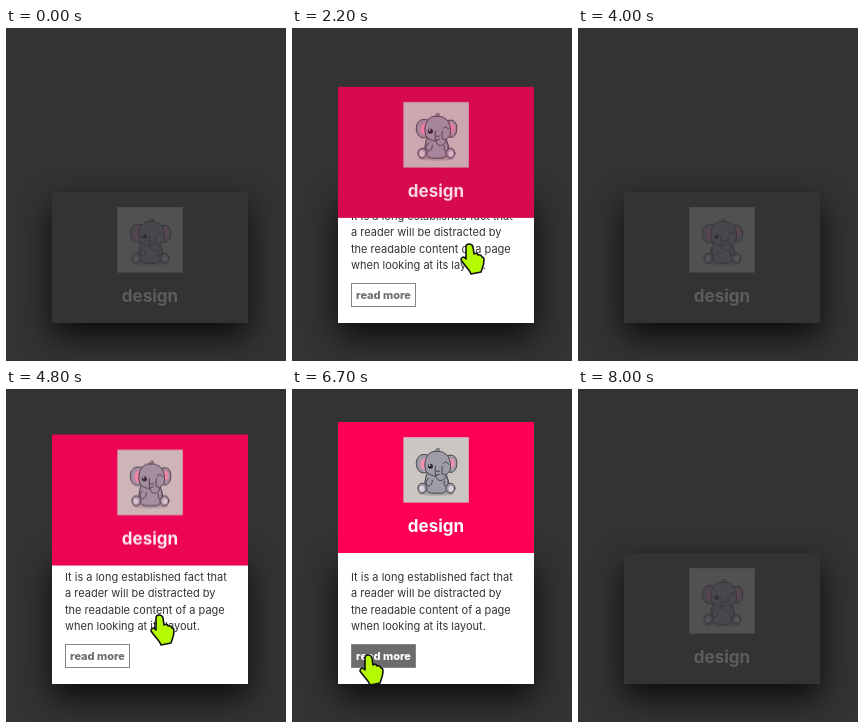
Animation, 280 px wide and 333 px high, one loop 9.2 s. Source, as an HTML page:

```html
<!DOCTYPE html>
<html lang="en">
<head>
<meta charset="utf-8">
<title>Hover card</title>
<style>
  html, body { margin: 0; width: 100%; height: 100%; overflow: hidden; background: #343235; }
  svg { display: block; width: 100vw; height: 100vh; }
  text { font-family: Inter, "Open Sans", sans-serif; }
  .copy { font-size: 11px; fill: #333; }
  .title { font-size: 17px; font-weight: 700; fill: #fff; text-anchor: middle; }
  .label { font-size: 11px; font-weight: 800; fill: #707070; text-anchor: middle; }
  .shadow { filter: blur(16.5px); opacity: .8; }
  .ink { stroke: #46444d; stroke-width: 1; stroke-linecap: round; stroke-linejoin: round; }
  .cursor { fill: #b5fa00; stroke: #111; stroke-width: 1.6; stroke-linejoin: round; }
</style>
</head>
<body>
<svg viewBox="0 0 280 333">
  <rect class="shadow" x="46" y="177" width="196" height="131"/>

  <rect x="46" y="164" width="196" height="131" fill="#fff"/>
  <g class="copy">
    <text x="59" y="192">It is a long established fact that</text>
    <text x="59" y="208.4">a reader will be distracted by</text>
    <text x="59" y="224.8">the readable content of a page</text>
    <text x="59" y="241.2">when looking at its layout.</text>
  </g>
  <rect id="button" x="59.5" y="255.5" width="64" height="23" fill="#fff" stroke="#858585"/>
  <text id="label" class="label" x="91.5" y="271">read more</text>

  <g id="face">
    <rect id="panel" x="46" y="33" width="196" height="131" fill="#343235"/>
    <g id="content">
      <g transform="translate(111.4 48.2)">
        <rect width="65.4" height="65.4" fill="#cbc6c2"/>
        <ellipse cx="33" cy="56" rx="18" ry="2.5" fill="#aaa5a5"/>
        <g class="ink" fill="#9d9ca7">
          <path d="M23 37Q18 55 28 56H39Q49 53 43 37Z"/>
          <path d="M27 19C18 14 12 20 13 28C14 35 20 38 25 34Z"/>
          <path d="M43 19C51 15 55 22 53 30C51 36 47 36 44 34Z"/>
          <path d="M25 20C15 20 15 32 22 33Q26 28 25 20ZM46 21C54 20 52 32 46 32Q44 27 46 21Z" fill="#ef91b0" stroke="none"/>
          <path d="M34 14C24 13 20 23 22 32C24 41 44 42 47 32C48 22 44 14 34 14Z"/>
          <path d="M32 14Q33 10 36 12Q34 13 36 14" fill="none"/>
          <path d="M32 29C31 38 33 45 39 43C44 41 42 36 39 37Q38 35 39 29" />
          <path d="M33 34L36 34M33 38L36 37" fill="none"/>
          <path d="M40 26Q43 23 45 27" fill="none"/>
          <ellipse cx="19" cy="51" rx="4.5" ry="5"/>
          <ellipse cx="47" cy="51" rx="4.5" ry="5"/>
          <path d="M25 41Q20 46 25 49Q29 48 29 43M41 44Q40 49 43 49Q46 47 44 41"/>
        </g>
        <circle cx="27" cy="29" r="2.5" fill="#29262e"/>
        <circle cx="26.3" cy="28" r=".8" fill="#fff"/>
        <ellipse cx="18.5" cy="51.5" rx="2.5" ry="3" fill="#d9d5da"/>
        <ellipse cx="47.5" cy="51.5" rx="2.5" ry="3" fill="#d9d5da"/>
      </g>
      <text class="title" x="144" y="143">design</text>
    </g>
  </g>

  <g id="pointer" class="cursor">
    <path id="arrow" d="M0 0V20L4.5 16.5L8 24.5L12 22.5L8.5 15H14.5Z"/>
    <path id="hand" d="M-4 2C-4-2 2-2 3 2L4 9Q7 7 8 10Q11 9 12 12Q14 12 14 15C14 21 12 23 11 27L1 29C0 25-5 21-9 15C-9 12-6 11-4 14Z"/>
  </g>
</svg>
<script>
  const LOOP = 9200, FRAME = 100, FADE = 500;
  const visits = [[1950, 3250], [4485, 7000]];
  const buttonHover = [[5950, 6850]];

  // Steps are [ms, properties, easing]; the picture advances in whole frames.
  function loop(id, steps) {
    const frames = steps.map(([ms, props, easing = 'linear']) =>
      ({ ...props, offset: ms / LOOP, easing }));
    document.getElementById(id).animate(frames, {
      duration: LOOP, iterations: Infinity, delay: -2,
      easing: `steps(${LOOP / FRAME}, end)`
    });
  }

  function toggle(id, off, on, spans, fade = 0) {
    const steps = spans.flatMap(([start, end]) => [
      [start, off, 'ease'], [start + fade, on],
      [end, on, 'ease'], [end + fade, off]
    ]);
    loop(id, [[0, off], ...steps, [LOOP, off]]);
  }

  const at = (x, y) => ({ transform: `translate(${x}px, ${y}px)` });

  toggle('face', at(0, 131), at(0, 0), visits, FADE);
  toggle('panel', { fill: '#343235' }, { fill: '#ff0057' }, visits, FADE);
  toggle('content', { opacity: .2 }, { opacity: 1 }, visits, FADE);
  toggle('hand', { opacity: 0 }, { opacity: 1 }, visits);
  toggle('arrow', { opacity: 1 }, { opacity: 0 }, visits);
  toggle('button', { fill: '#fff' }, { fill: '#6c6c6c' }, buttonHover);
  toggle('label', { fill: '#707070' }, { fill: '#fff' }, buttonHover);

  const path = [
    [0, 310, 205], [1750, 290, 205], [1950, 240, 210],
    [2200, 178, 217], [2700, 165, 222], [2950, 180, 220],
    [3250, 241, 215], [3400, 257, 215], [3650, 300, 215],
    [4350, 295, 215], [4485, 241, 219], [4800, 154, 227],
    [5300, 140, 235], [5600, 120, 248], [5950, 98, 266],
    [6300, 82, 267], [6700, 77, 267], [6850, 76, 278],
    [7000, 75, 296], [7250, 73, 340], [LOOP, 73, 345]
  ];
  loop('pointer', path.map(([ms, x, y]) => [ms, at(x, y)]));
</script>
</body>
</html>
```
